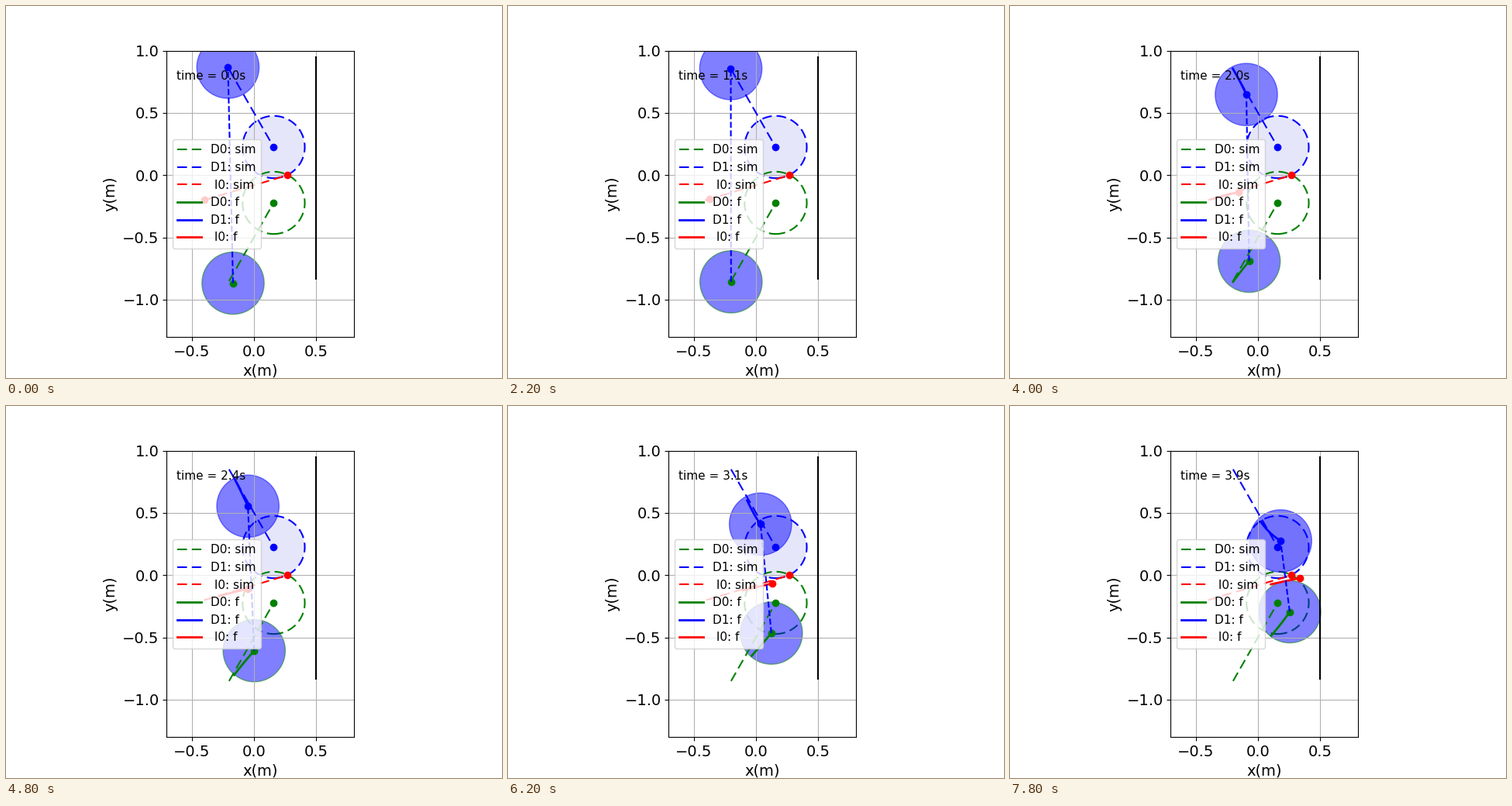
Recreate the animation shown at these times as a matplotlib script. Size 640x480 px, loop 8000 ms.

```python
import numpy as np
import matplotlib.pyplot as plt
from matplotlib.animation import FuncAnimation
from matplotlib.patches import Circle

FRAMES, STEP = 40, 0.1   # simulated seconds per frame
TAIL = 10                # samples kept in each trail
RADIUS = 0.25
LONG_DASH = (0, (6, 3))
COLORS = {"D0": "green", "D1": "blue", "I0": "red"}

plt.rcParams["text.kerning_factor"] = 6


def ramp(t, onset, softness):
    """Rest until the onset, then steady travel, with a soft start."""
    return softness * np.logaddexp(0, (t - onset) / softness)


def path(s, x, y):
    """Points of a curve from polynomial coefficients, highest power first."""
    return np.column_stack([np.polyval(x, s), np.polyval(y, s)])


def sim_line(start, goal, color, label):
    ax.plot(*zip(start, goal), color=color, lw=1.5, ls=LONG_DASH, label=label)
    ax.plot(*goal, "o", color=color)


t = np.arange(FRAMES) * STEP
tracks = {
    "D0": path(ramp(t, 1.28, 0.15),
               (-0.007, 0.195, -0.208), (0.0098, -0.046, 0.272, -0.867)),
    "D1": path(ramp(t, 1.17, 0.1),
               (0.0164, -0.0565, 0.175, -0.209), (0.025, -0.285, 0.867)),
    "I0": path(ramp(t, 1.04, 0.1),
               (0.257, -0.4), (-0.0035, 0.0715, -0.2)),
}
tracks["D0"][:, 0] += 0.04 * np.exp(-t / 0.2)   # settles at the beginning

fig = plt.figure(figsize=(6.4, 4.8), dpi=100)
ax = fig.add_subplot()
ax.set_aspect("equal")
ax.set_xlim(-0.7, 0.8)
ax.set_ylim(-1.3, 1.0)
ax.set_xticks(np.arange(-0.5, 0.6, 0.5))
ax.set_yticks(np.arange(-1, 1.1, 0.5))
ax.tick_params(labelsize=14)
ax.set_xlabel("x(m)", fontsize=14)
ax.set_ylabel("y(m)", fontsize=14)
ax.grid(True)

goals = {"D0": (0.158, -0.222), "D1": (0.158, 0.226), "I0": (0.27, 0)}
ax.add_patch(Circle(goals["D1"], RADIUS, fc="lavender", ec="none"))
for k in ("D0", "D1"):
    ax.add_patch(Circle(goals[k], RADIUS, fill=False, ec=COLORS[k],
                        lw=1.5, ls=LONG_DASH))
discs = {k: ax.add_patch(Circle((0, 0), RADIUS, fc="blue", ec=COLORS[k],
                                alpha=0.5))
         for k in ("D0", "D1")}

ax.plot([0.5, 0.5], [-0.83, 0.95], color="black", lw=1.5)
sim_line((-0.2, -0.85), goals["D0"], "green", "D0: sim")
sim_line((-0.2, 0.85), goals["D1"], "blue", "D1: sim")
sim_line((-0.4, -0.2), goals["I0"], "red", " I0: sim")

trails = {k: ax.plot([], [], color=c, lw=2, label=f"{k}: f".replace("I", " I"))[0]
          for k, c in COLORS.items()}
dots = {k: ax.plot([], [], "o", color=c)[0] for k, c in COLORS.items()}
link, = ax.plot([], [], "--", color="blue", lw=1.5)
clock = ax.text(0.05, 0.9, "", transform=ax.transAxes, fontsize=11)
ax.legend(loc="center left", fontsize=11)


def update(i):
    for k, track in tracks.items():
        trails[k].set_data(*track[max(0, i - TAIL + 1):i + 1].T)
        dots[k].set_data(track[i, :1], track[i, 1:])
    for k, disc in discs.items():
        disc.center = tracks[k][i]
    link.set_data(*zip(tracks["D0"][i], tracks["D1"][i]))
    clock.set_text(f"time = {t[i]:.1f}s")
    return [*trails.values(), *dots.values(), *discs.values(), link, clock]


anim = FuncAnimation(fig, update, frames=FRAMES, interval=200, repeat=True,
                     init_func=lambda: update(0))
plt.show()
```
